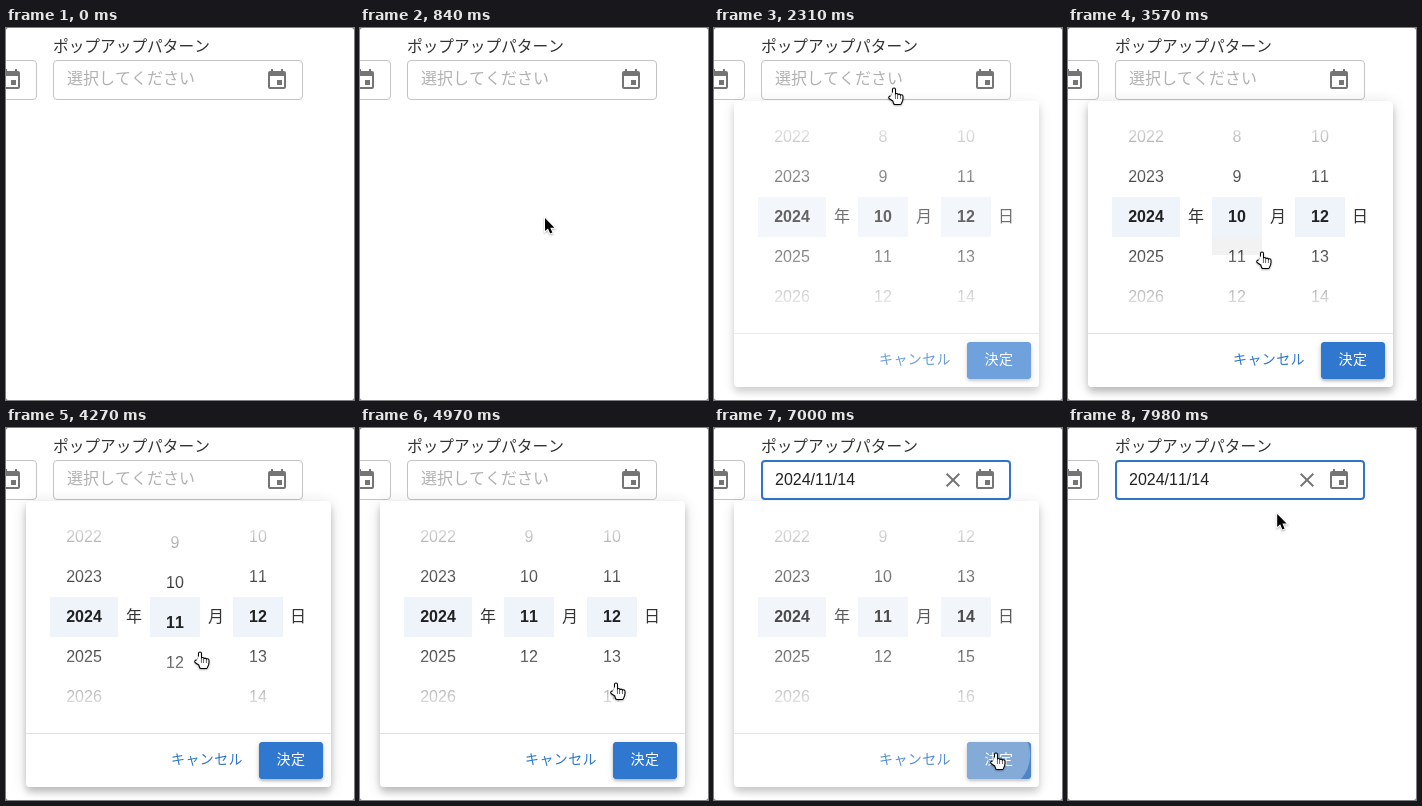
Write an HTML page with a canvas that moves like this. It is 348 px wide and 372 px high and loops after 8 s.

```html
<!DOCTYPE html>
<html lang="ja">
<head>
<meta charset="utf-8">
<title>Date picker</title>
<style>
html, body { margin: 0; width: 100%; height: 100%; overflow: hidden; background: #fff; }
canvas { display: block; width: 348px; height: 372px; }
</style>
</head>
<body>
<canvas id="stage"></canvas>
<script>
const W = 348, H = 372, LOOP = 8000, TICK = 70;
const ROW = 40, MID = 188;
const OPEN = 2070, CLOSE = 6930;
const SANS = '"Liberation Sans", Arial, sans-serif';
const JP = '"Noto Sans CJK JP", "Noto Sans CJK", sans-serif';
const INK = '#212121', GREY = '#757575', LINE = '#c4c4c4', BLUE = '#2f76c9';
const dpr = window.devicePixelRatio || 1;

function setup(canvas) {
  canvas.width = W * dpr;
  canvas.height = H * dpr;
  const c = canvas.getContext('2d');
  c.scale(dpr, dpr);
  c.fontKerning = 'none';
  return c;
}
const sheet = document.createElement('canvas');
const ctx = setup(document.getElementById('stage')), pop = setup(sheet);

// Pointer moves: each starts at `at` and glides to x, y
const GLIDE = 400;
const MOVES = [
  { at: 230, x: 185, y: 190 },
  { at: 840, x: 192, y: 60 },
  { at: 1350, x: 180, y: 60 },
  { at: 2730, x: 194, y: 224 },
  { at: 4500, x: 256, y: 255 },
  { at: 6070, x: 282, y: 325 },
  { at: 7610, x: 208, y: 82 }
];
const CLICKS = [1820, 5250, 6720];

const within = (t, a, b) => t >= a && t < b;
const ramp = (t, a, b) => Math.max(0, Math.min(1, (t - a) / (b - a)));
function ease(t, a, b) {
  const p = ramp(t, a, b);
  return p * p * (3 - 2 * p);
}

function text(c, str, x, y, { font = SANS, size = 16, weight = 400, color = INK, align = 'left', gap = 0 } = {}) {
  c.font = `${weight} ${size}px ${font}`;
  c.letterSpacing = gap + 'px';
  c.fillStyle = color;
  c.textAlign = align;
  c.fillText(str, x, y);
}

function box(c, x, y, w, h, r) {
  c.beginPath();
  c.roundRect(x, y, w, h, r);
}

function shadow(c, dy, blur, alpha) {
  c.shadowColor = `rgba(0,0,0,${alpha})`;
  c.shadowOffsetY = dy * dpr;
  c.shadowBlur = blur * dpr;
}

function raised(c, color, x, y, w, h, lift) {
  c.save();
  c.fillStyle = color;
  box(c, x, y, w, h, 4);
  shadow(c, lift, lift * 1.4, .2);
  c.fill();
  shadow(c, lift / 2, lift * 3, .14);
  c.fill();
  c.restore();
}

function calendar(x, y) {
  ctx.fillStyle = GREY;
  box(ctx, x, y + 2, 18, 18, 2);
  ctx.rect(x + 2, y + 7, 14, 11);
  ctx.rect(x + 9, y + 11, 5, 5);
  ctx.rect(x + 3, y, 2, 2);
  ctx.rect(x + 13, y, 2, 2);
  ctx.fill('evenodd');
}

function cross(x, y, r) {
  ctx.strokeStyle = GREY;
  ctx.lineWidth = 2;
  ctx.beginPath();
  for (const s of [-r, r]) {
    ctx.moveTo(x - r, y - s);
    ctx.lineTo(x + r, y + s);
  }
  ctx.stroke();
}

function field(x, color, thick) {
  const i = thick / 2;
  box(ctx, x + i, 32 + i, 250 - thick, ROW - thick, 4 - i);
  ctx.strokeStyle = color;
  ctx.lineWidth = thick;
  ctx.stroke();
  calendar(x + 215, 41);
}

function form(t) {
  const done = t >= CLOSE;
  field(-219, LINE, 1);
  text(ctx, 'ポップアップパターン', 47, 24, { font: JP, size: 15.7, color: '#333' });
  if (done || within(t, 1820, OPEN)) field(47, BLUE, 2);
  else field(47, within(t, 1540, 1820) ? INK : LINE, 1);
  if (done) {
    text(ctx, '2024/11/14', 61, 57);
    cross(239, 52, 6.3);
  } else {
    text(ctx, '選択してください', 61, 56, { font: JP, color: '#b2b2b2' });
  }
}

function wheel(c, x, w, value, max) {
  c.save();
  c.beginPath();
  c.rect(x, 102, w, 172);
  c.clip();
  c.fillStyle = '#eff4fa';
  c.fillRect(x, 169, w, ROW);
  const mid = Math.round(value);
  for (let n = mid - 3; n <= Math.min(max, mid + 3); n++) {
    text(c, n, x + w / 2, MID + 6 + (n - value) * ROW, { align: 'center', weight: n === mid ? 700 : 400 });
  }
  // Rows fade to white away from the middle
  const veil = c.createLinearGradient(0, MID - 100, 0, MID + 100);
  for (const s of [0, .4, .6, 1]) veil.addColorStop(s, `rgba(255,255,255,${s % 1 ? 0 : 1})`);
  c.fillStyle = veil;
  c.fillRect(x, 88, w, 200);
  c.restore();
}

function button(c, t) {
  const hover = ease(t, 6300, 6550);
  raised(c, `hsl(213 ${62 + 4 * hover}% ${50 - 6 * hover}%)`, 253, 314, 64, 37, 2);
  text(c, '決定', 270.5, 336, { font: JP, size: 14, color: '#fff', gap: .4 });
  const grow = ramp(t, 6790, 7040);
  if (!grow) return;
  c.save();
  box(c, 253, 314, 64, 37, 4);
  c.clip();
  c.fillStyle = 'rgba(255,255,255,.3)';
  c.beginPath();
  c.arc(280, 327, 6 + 36 * grow, 0, 7);
  c.fill();
  c.restore();
}

function popup(t) {
  const alpha = ease(t, OPEN, 2450) * (1 - ease(t, CLOSE + 15, 7140));
  if (!alpha) return;
  const c = pop;
  c.clearRect(0, 0, W, H);
  raised(c, '#fff', 20, 73, 305, 286, 5);
  wheel(c, 44, 68, 2024, 2099);
  wheel(c, 144, 50, 10 + ease(t, 3640, 4480), 12);
  wheel(c, 227, 50, 12 + 2 * ease(t, 5320, 5740), 31);
  if (within(t, 3570, 3710)) {
    c.fillStyle = 'rgba(0,0,0,.05)';
    c.fillRect(144, 209, 50, 18);
  }
  [...'年月日'].forEach((unit, i) =>
    text(c, unit, 128 + 82 * i, MID + 6, { font: JP, align: 'center', color: '#333' }));
  c.fillStyle = '#e0e0e0';
  c.fillRect(20, 305, 305, 1);
  text(c, 'キャンセル', 165, 336, { font: JP, size: 14, color: BLUE, gap: .4 });
  button(c, t);
  ctx.globalAlpha = alpha;
  ctx.drawImage(sheet, 0, 0, W, H);
  ctx.globalAlpha = 1;
}

function tip(t) {
  let x = 200, y = 330;
  for (const m of MOVES) {
    const p = ease(t, m.at, m.at + GLIDE);
    x += (m.x - x) * p;
    y += (m.y - y) * p;
  }
  return [x, y];
}

function hand() {
  ctx.lineCap = ctx.lineJoin = 'round';
  ctx.beginPath();
  ctx.moveTo(0, 1.5);
  ctx.lineTo(0, 12);
  ctx.lineTo(-3.8, 9.5);
  for (let i = 1; i < 4; i++) {
    ctx.moveTo(2.5 * i, 6.4 + .6 * i);
    ctx.lineTo(2.5 * i, 11);
  }
  ctx.moveTo(0, 12);
  ctx.lineTo(7.3, 12);
  ctx.lineTo(6, 15);
  ctx.lineTo(1, 15);
  ctx.closePath();
  for (const [color, width] of [['#000', 4], ['#fff', 1.9]]) {
    ctx.strokeStyle = ctx.fillStyle = color;
    ctx.lineWidth = width;
    ctx.stroke();
    ctx.fill();
    ctx.shadowColor = 'transparent';
  }
}

function arrow() {
  const shape = new Path2D('M0 0V13L3 10.4 5.2 15.5 7.4 14.6 5.2 9.7H9.4Z');
  ctx.strokeStyle = '#fff';
  ctx.lineWidth = 2;
  ctx.stroke(shape);
  ctx.shadowColor = 'transparent';
  ctx.fillStyle = '#000';
  ctx.fill(shape);
}

function pointer(t) {
  if (t < 350) return;
  ctx.save();
  ctx.translate(...tip(t));
  if (CLICKS.some(at => within(t, at, at + 2 * TICK))) {
    ctx.strokeStyle = 'rgba(0,0,0,.28)';
    ctx.lineWidth = 2;
    ctx.beginPath();
    ctx.arc(0, 0, 30, 0, 7);
    ctx.stroke();
  }
  shadow(ctx, 1, 2, .3);
  if (within(t, 1540, 2660) || within(t, 3080, 7280)) hand();
  else arrow();
  ctx.restore();
}

function corners() {
  ctx.fillStyle = '#777';
  box(ctx, 0, 0, W, H, 2.5);
  ctx.rect(0, 0, W, H);
  ctx.fill('evenodd');
}

function draw(now) {
  const t = Math.floor((now % LOOP) / TICK) * TICK;
  ctx.fillStyle = '#fff';
  ctx.fillRect(0, 0, W, H);
  form(t);
  popup(t);
  pointer(t);
  corners();
}

let start;
function loop(now) {
  start ??= now;
  draw(Math.max(0, now - start));
  requestAnimationFrame(loop);
}
draw(0);
requestAnimationFrame(loop);
</script>
</body>
</html>
```
